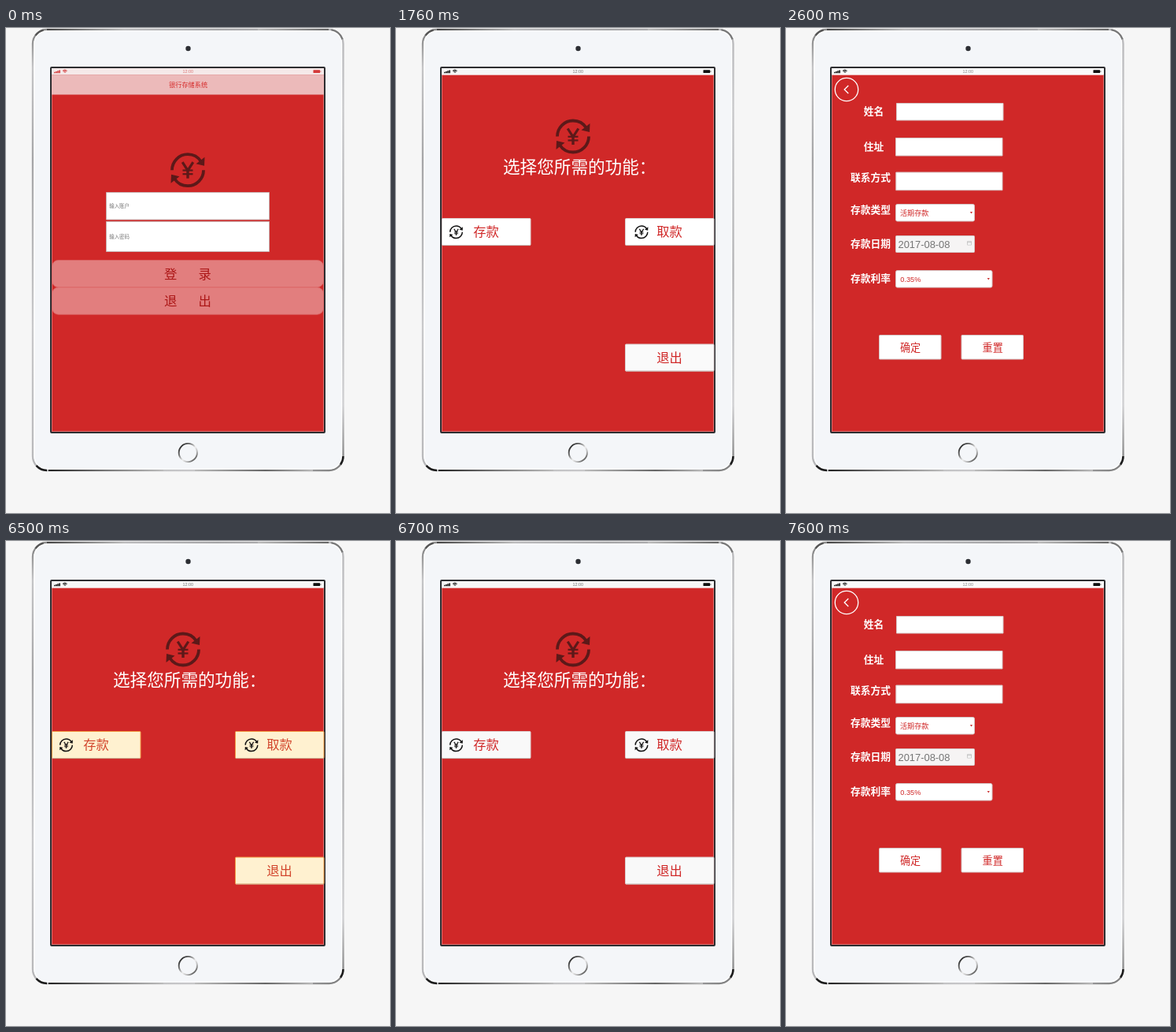
These frames come from a looping animation (488x615 px, 8 s). An HTML page with a canvas:

```html
<!DOCTYPE html>
<html lang="zh-CN">
<head>
<meta charset="utf-8">
<title>银行存储系统</title>
<style>
html, body { margin: 0; width: 100%; height: 100%; overflow: hidden; background: #f6f6f6; }
canvas { display: block; width: 488px; height: 615px; }
</style>
</head>
<body>
<canvas id="stage"></canvas>
<script>
const W = 488, H = 615, LOOP = 8000;
const CJK = '"Noto Sans CJK SC", "Noto Sans CJK", sans-serif';
const ARIAL = '"Liberation Sans", Arial, sans-serif';
const RED = '#d02828';
const canvas = document.getElementById('stage');
const ctx = canvas.getContext('2d');
const dpr = window.devicePixelRatio || 1;
canvas.width = W * dpr;
canvas.height = H * dpr;
ctx.scale(dpr, dpr);

function box(x, y, w, h, fill, r = 0, stroke, lw = 1) {
  ctx.beginPath();
  ctx.roundRect(x, y, w, h, r);
  if (fill) { ctx.fillStyle = fill; ctx.fill(); }
  if (stroke) { ctx.strokeStyle = stroke; ctx.lineWidth = lw; ctx.stroke(); }
}

function line(points, color, lw) {
  ctx.beginPath();
  points.forEach(([x, y]) => ctx.lineTo(x, y));
  ctx.strokeStyle = color;
  ctx.lineWidth = lw;
  ctx.stroke();
}

function shape(points, color) {
  ctx.beginPath();
  points.forEach(([x, y]) => ctx.lineTo(x, y));
  ctx.fillStyle = color;
  ctx.fill();
}

function arc(x, y, r, from, to, color, lw) {
  ctx.beginPath();
  ctx.arc(x, y, r, from, to);
  ctx.strokeStyle = color;
  ctx.lineWidth = lw;
  ctx.stroke();
}

// cy is the optical middle of the line
function text(str, x, cy, size, color, weight = 400, family = CJK) {
  ctx.font = `${weight} ${size}px ${family}`;
  ctx.fillStyle = color;
  ctx.fillText(str, x, cy + size * (family === CJK ? 0.38 : 0.36));
}

function gradient(x0, y0, x1, y1, stops) {
  const g = ctx.createLinearGradient(x0, y0, x1, y1);
  stops.forEach(([at, color]) => g.addColorStop(at, color));
  return g;
}

function yen(x, y, scale, color) {
  ctx.save();
  ctx.translate(x, y);
  ctx.scale(scale, scale);
  for (let i = 0; i < 2; i++) {
    arc(0, 0, 20, Math.PI, Math.PI * 1.82, color, 3.8);
    shape([[21.5, -16.5], [21, -5.5], [10.5, -8]], color);
    ctx.rotate(Math.PI);
  }
  line([[-6.8, -10], [0, 0.5], [6.8, -10]], color, 3.2);
  line([[0, -1], [0, 10.5]], color, 3.4);
  line([[-6.5, 0.3], [6.5, 0.3]], color, 2.2);
  line([[-6.5, 5], [6.5, 5]], color, 2.2);
  ctx.restore();
}

function device() {
  box(0, 0, W, H, '#f6f6f6');
  const metal = gradient(33, 0, 429, 562, [
    [0, '#777'], [0.06, '#c4c4c6'], [0.2, '#a4a4a6'], [0.45, '#c8c8ca'],
    [0.7, '#b4b4b6'], [0.9, '#d0d0d2'], [1, '#777']
  ]);
  box(34, 2, 394.5, 559, '#f4f6f9', 18, metal, 2.4);
  box(36, 4, 390.5, 555, null, 16, '#fff', 1.2);

  line([[52, 2], [150, 2]], gradient(52, 0, 150, 0, [[0, '#444'], [1, '#bbb']]), 2);
  line([[320, 2], [410, 2]], gradient(320, 0, 410, 0, [[0, '#bbb'], [1, '#666']]), 2);
  line([[54, 561], [200, 561]], gradient(54, 0, 200, 0, [[0, '#222'], [0.5, '#777'], [1, '#bbb']]), 2);
  line([[240, 561], [390, 561]], gradient(240, 0, 390, 0, [[0, '#bbb'], [0.6, '#666'], [1, '#bbb']]), 2);
  arc(52, 20, 18, Math.PI * 1.2, Math.PI * 1.42, '#555', 2.2);
  arc(410.5, 20, 18, Math.PI * 1.55, Math.PI * 1.9, '#777', 2.2);
  arc(52, 543, 18, Math.PI * 0.5, Math.PI * 0.77, '#1c1c1c', 2.4);
  arc(410.5, 543, 18, 0, Math.PI * 0.2, '#1c1c1c', 2.4);

  ctx.beginPath();
  ctx.arc(231.5, 26, 3.2, 0, Math.PI * 2);
  ctx.fillStyle = '#2c2e33';
  ctx.fill();

  const ring = gradient(222, 529, 241, 548, [
    [0, '#222'], [0.3, '#777'], [0.55, '#eee'], [0.75, '#bbb'], [1, '#444']
  ]);
  arc(231.3, 538.5, 11.6, 0, Math.PI * 2, ring, 1.9);

  box(57, 50, 348, 463, RED, 1, '#2d2d30', 2);
  box(58.5, 59.5, 345, 452, null, 0, 'rgba(255,255,255,.4)', 0.8);
}

function statusBar(bg, ink, clock) {
  box(58, 51, 346, 8.5, bg);
  for (let i = 0; i < 4; i++) box(61 + i * 2.1, 55.8 - i * 0.8, 1.6, 1.4 + i * 0.8, ink);
  for (const r of [1.2, 2.6, 4]) arc(74.8, 57.2, r, Math.PI * 1.25, Math.PI * 1.75, ink, 1);
  text('12:00', 224.6, 55.2, 5.4, clock, 400, ARIAL);
  box(390.5, 53.2, 8.6, 3.8, ink, 0.6);
  box(399.5, 54.4, 0.8, 1.4, ink);
}

function login() {
  statusBar('#f5e9e9', '#d43a3a', '#d77');
  box(58, 59, 346, 25.5, '#ecbaba');
  line([[58, 59.5], [404, 59.5]], '#e5a5a5', 0.8);
  text('银行存储系统', 207, 71.7, 8.2, '#d62c2c');
  yen(231, 180.2, 1, '#5c1919');

  box(127.5, 208.5, 207, 34.5, '#fff', 0, '#c9b5b5');
  box(127.5, 245.5, 207, 38, '#fff', 0, '#c9b5b5');
  text('输入账户', 131.3, 226, 6.4, '#777');
  text('输入密码', 131.3, 265, 6.4, '#777');

  [['登', '录', 294.5], ['退', '出', 329]].forEach(([a, b, y]) => {
    box(58.5, y, 345, 34.2, '#e27e7e', 8, '#dc6a6a', 0.8);
    text(a, 201, y + 17, 16.4, '#ac1717', 500);
    text(b, 244.5, y + 17, 16.4, '#ac1717', 500);
  });
}

function menu(fills, border, ink) {
  statusBar('#f6f6f6', '#111', '#777');
  yen(225, 137.5, 1, '#5c1919');
  text('选择您所需的功能：', 136, 175.3, 21.6, '#fff', 500);
  [['存款', 58, 241, true], ['取款', 291, 241, true], ['退出', 291, 400.5, false]]
    .forEach(([label, x, y, icon], i) => {
      box(x + 0.5, y + 0.5, 112.5, 34, fills[i], 1, border);
      line([[x + 1, y + 34.6], [x + 112.5, y + 34.6]], '#c2b8b2', 0.8);
      if (icon) yen(x + (x < 100 ? 18.5 : 21), 258.8, 0.39, '#111');
      text(label, x + 40.3, y + 17.3, 16.3, ink, 300);
    });
}

function caret(x, y) {
  shape([[x - 1.6, y - 1], [x + 1.6, y - 1], [x, y + 1.6]], '#c33');
}

function form() {
  statusBar('#fafafa', '#111', '#888');
  arc(77, 78, 14.7, 0, Math.PI * 2, '#fff', 1.3);
  line([[79.3, 73], [74.2, 78], [79.3, 83]], '#fff', 1.3);

  [['姓名', 98.8, 105], ['住址', 98.8, 150.3], ['联系方式', 82, 189.5],
   ['存款类型', 82, 230.2], ['存款日期', 82, 273], ['存款利率', 82, 317.3]]
    .forEach(([label, x, y]) => text(label, x, y, 12.75, '#fff', 700));

  const edge = '#d5c4c4';
  box(140.5, 95.5, 135.5, 21.5, '#fff', 0, edge);
  box(139.5, 139.5, 135.5, 22.5, '#fff', 0, edge);
  box(139.8, 183, 135.2, 22.7, '#fff', 0, edge);
  box(139.5, 223.5, 100, 21.5, '#fff', 2, edge);
  box(139.5, 263.5, 100, 21, '#f6f4f4', 1, edge);
  box(139.5, 307.5, 122.5, 21.5, '#fff', 2, edge);

  text('活期存款', 145, 234.7, 9.1, RED);
  caret(235.5, 234);
  text('2017-08-08', 142.5, 274.2, 12.9, '#757575', 400, ARIAL);
  box(230.5, 270.5, 5, 4.6, '#fff', 0, '#bbb', 0.7);
  line([[230.5, 272], [235.5, 272]], '#aaa', 0.8);
  text('0.35%', 145.3, 318.4, 9.2, RED, 400, ARIAL);
  caret(257.3, 318);

  box(118.5, 389.5, 78.5, 30.5, '#fff', 1, edge);
  box(223, 389.5, 78.5, 30.5, '#fff', 1, edge);
  text('确定', 145, 405, 13.1, RED);
  text('重置', 249.6, 405, 13.1, RED);
}

const scenes = [
  [500, login],
  [2600, () => menu(['#fff', '#fff', '#fafafa'], '#ddd0d0', RED)],
  [6500, form],
  [6700, () => menu(Array(3).fill('#fff1d0'), '#f29a45', '#d2452c')],
  [7600, () => menu(Array(3).fill('#f9f9f9'), '#ddd0d0', RED)],
  [LOOP, form]
];

const start = performance.now();
function frame() {
  const t = (performance.now() - start) % LOOP;
  device();
  scenes.find(([end]) => t < end)[1]();
  requestAnimationFrame(frame);
}
frame();
</script>
</body>
</html>
```
